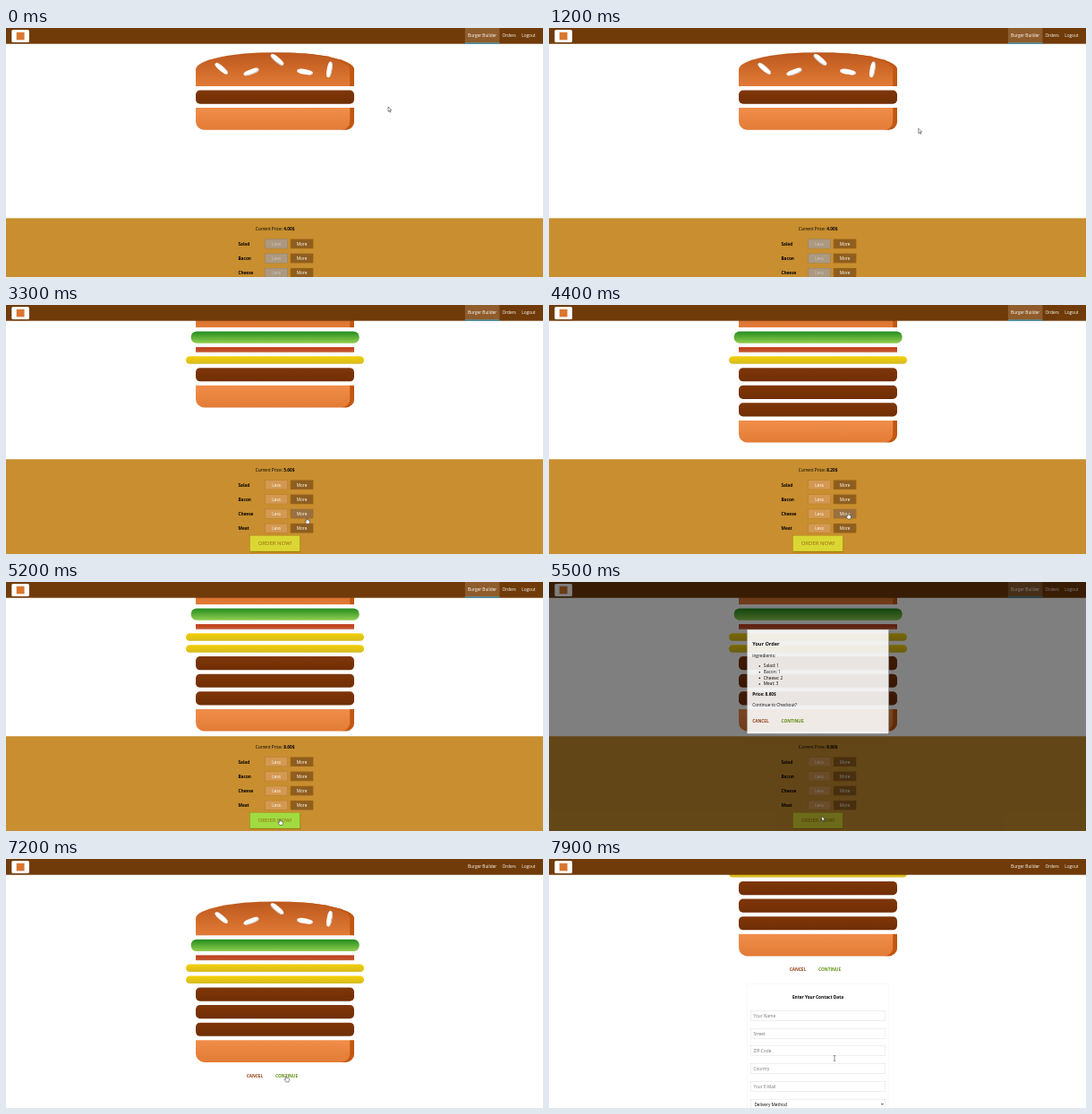
Recreate the animation shown at these times as an HTML page. Size 600 by 278 pixels, loop 8000 ms.

```html
<!DOCTYPE html>
<html lang="en">
<head>
<meta charset="utf-8">
<title>Burger Builder</title>
<style>
* { box-sizing: border-box; }
html, body { margin: 0; width: 100%; height: 100%; overflow: hidden; background: #fff; }
#view {
  position: absolute; left: 0; top: 0; width: 1902px; height: 880px; overflow: hidden;
  transform: scale(.316); transform-origin: 0 0; background: #fff;
  font: 15px/21px "Open Sans", "Noto Sans", sans-serif; color: #000;
}
p { margin: 16px 0; }
button { font: inherit; display: block; outline: none; }

nav {
  position: absolute; left: 0; top: 0; width: 100%; height: 56px; padding: 0 20px;
  background: #703b09; display: flex; align-items: center; justify-content: space-between;
}
.logo { width: 62px; height: 45px; border-radius: 5px; background: #fff; padding: 9px 17px; }
.logo i { display: block; width: 28px; height: 27px; background: #d9772f; }
.links { display: flex; height: 100%; color: #fff; }
.links span { padding: 17px 10px 0; border-bottom: 4px solid transparent; }
.links .active { background: #8f5c2c; border-color: #40a4c8; }

#page { position: absolute; left: 0; top: 0; width: 100%; padding-top: 72px; }
#burger { width: 700px; height: 600px; margin: 0 auto; overflow: hidden; }
#burger > div { width: 80%; margin: 14px auto; position: relative; }
#burger .top {
  height: 120px; background: linear-gradient(#bc581e, #e27b36);
  border-radius: 50% 50% 0 0; box-shadow: inset -15px 0 #c15711;
}
#burger .bottom {
  height: 78px; background: linear-gradient(#f08e4a, #e27b36);
  border-radius: 0 0 30px 30px; box-shadow: inset -15px 0 #c15711;
}
#burger .salad { width: 85%; height: 42px; background: linear-gradient(#228c1d, #91ce50); border-radius: 20px; }
#burger .bacon { height: 18px; background: linear-gradient(#bf3813, #c45e38); }
#burger .cheese { width: 90%; height: 27px; background: linear-gradient(#f4d004, #d6bb22); border-radius: 20px; }
#burger .meat { height: 48px; background: linear-gradient(#7f3608, #702e05); border-radius: 15px; }
.seed, .seed::before, .seed::after { position: absolute; background: #fff; border-radius: 40%; }
.seed { width: 10%; height: 15%; top: 50%; }
.seed::before, .seed::after { width: 100%; height: 100%; }
.s1 { left: 30%; transform: rotate(-20deg); box-shadow: inset -2px -3px #c9c9c9; }
.s1::after { content: ""; left: -170%; top: -260%; transform: rotate(60deg); box-shadow: inset -1px 2px #c9c9c9; }
.s1::before { content: ""; left: 180%; top: -50%; transform: rotate(60deg); box-shadow: inset -1px -3px #c9c9c9; }
.s2 { left: 64%; transform: rotate(10deg); box-shadow: inset -3px 0 #c9c9c9; }
.s2::before { content: ""; left: 150%; top: -130%; transform: rotate(90deg); box-shadow: inset 1px 3px #c9c9c9; }

#panel {
  height: 345px; padding-top: 12px; background: #c88e2f;
  display: flex; flex-direction: column; align-items: center;
}
.control { display: flex; align-items: center; margin: 5px 0; }
.control b { width: 100px; padding: 10px; }
.control button { width: 80px; height: 33px; margin: 0 5px; padding: 0; border: 1px solid #aa6817; color: #fff; }
.less { background: #d39952; }
.more { background: #8f5e1e; }
.less.hover { background: #daa972; }
.more.hover { background: #99703f; }
.control .less:disabled { background: #ac9980; border-color: #7e7365; color: #ccc; }
.order {
  width: 178px; height: 57px; padding: 0; font-size: 19px; color: #966909;
  background: #dad735; border: 1px solid #966909; box-shadow: 2px 2px 2px #966909;
}
.order.hover { background: #a0db41; }

.acts { display: flex; }
.acts button { background: none; border: 0; padding: 10px; margin: 10px; font-weight: bold; }
.acts .no { color: #944317; margin-left: 0; padding-left: 0; margin-right: 14px; }
.acts .yes { color: #5c9210; }
#shade { position: absolute; inset: 0; background: rgba(0, 0, 0, .5); }
#modal {
  position: absolute; left: 701px; top: 264px; width: 500px; height: 368px; padding: 37px 17px 0;
  background: #fff; border: 1px solid #ccc; box-shadow: 1px 1px 1px #000;
}
#modal h3 { font-size: 17.5px; line-height: 25px; margin: 0 0 18px; }
#modal ul { margin: 0; padding-left: 40px; }

#summary .acts { justify-content: center; }
#form {
  width: 500px; height: 700px; margin: 20px auto 0; padding: 35px 10px 0; text-align: center;
  border: 1px solid #eee; box-shadow: 0 2px 3px #ccc;
}
#form h4 { margin: 0 0 23px; font-size: 15px; }
.field { height: 62.6px; padding: 13.3px 0; text-align: left; }
.field div { height: 36px; border: 1px solid #ccc; padding: 7px 10px; color: #757575; position: relative; }
.field .pick { color: #000; padding-left: 13px; }
.pick svg { position: absolute; right: 5px; top: 13px; }

#pointer { position: absolute; left: 0; top: 0; pointer-events: none; }
#pointer svg { position: absolute; overflow: visible; fill: #fff; stroke: #000; stroke-width: 1.4; stroke-linejoin: round; }
[hidden] { display: none !important; }
</style>
</head>
<body>
<div id="view">
  <div id="page">
    <div id="burger"></div>
    <div id="panel">
      <p>Current Price: <b id="price"></b></p>
      <button class="order">ORDER NOW!</button>
    </div>
    <div id="summary">
      <div class="acts"><button class="no">CANCEL</button><button class="yes">CONTINUE</button></div>
      <div id="form"><h4>Enter Your Contact Data</h4></div>
    </div>
  </div>
  <nav>
    <div class="logo"><i></i></div>
    <div class="links"><span id="home">Burger Builder</span><span>Orders</span><span>Logout</span></div>
  </nav>
  <div id="shade"></div>
  <div id="modal">
    <h3>Your Order</h3>
    <p>ingredients:</p>
    <ul id="list"></ul>
    <p><b>Price: <span id="total"></span></b></p>
    <p>Continue to Checkout?</p>
    <div class="acts"><button class="no">CANCEL</button><button class="yes">CONTINUE</button></div>
  </div>
  <div id="pointer">
    <svg id="arrow" width="13" height="20"><path d="M0 0V17L4 13.5L6.7 19.5L9.3 18.4L6.7 12.4H12Z"/></svg>
    <svg id="hand" width="18" height="23" style="left:-7px"><path d="M5 13V2Q7-1 9 2V8Q11 6.5 12 8.5Q14 7.5 15 9.5Q17.5 8.5 18 11V16L15.5 22H7L1 14.5Q0 11.5 3 11.8Z"/></svg>
    <svg id="beam" width="8" height="18" style="left:-4px;top:-9px"><path fill="none" d="M0 0H3L4 1L5 0H8M4 1V17M0 18H3L4 17L5 18H8"/></svg>
  </div>
</div>
<script>
const LOOP = 8000, SCALE = .316;
const $ = id => document.getElementById(id);

// layer name, price, starting count, times it is added
const layers = [
  ['Salad', .5, 0, [2500]],
  ['Bacon', .7, 0, [2800]],
  ['Cheese', .4, 0, [3200, 4500]],
  ['Meat', 1.3, 1, [3800, 4100]]
];
const OPEN = 5300, CHECKOUT = 6700, FORM = 7250;

// pointer stops: time, x, y
const path = [
  [0, 427, 88], [1000, 427, 88], [1800, 337, 241], [2500, 337, 241], [2700, 337, 257],
  [2950, 337, 257], [3150, 336, 237.5], [3350, 336, 237.5], [3650, 335, 249], [4150, 335, 249],
  [4350, 334, 232], [4550, 334, 232], [5050, 306, 264.5], [5400, 306, 264.5], [6250, 275, 185],
  [6650, 275, 185], [7100, 313, 242], [7300, 313, 242], [7750, 319, 222.5], [LOOP, 319, 222.5]
];

const clamp = v => Math.max(0, Math.min(1, v));
const span = (t, from, to) => clamp((t - from) / (to - from));
const smooth = p => p * p * (3 - 2 * p);
const easeOut = p => 1 - (1 - p) ** 2;

const order = document.querySelector('.order');
const lessButtons = layers.map(([name]) => {
  const row = document.createElement('div');
  row.className = 'control';
  row.innerHTML = `<b>${name}</b><button class="less">Less</button><button class="more">More</button>`;
  $('panel').insertBefore(row, order);
  return row.querySelector('.less');
});

$('form').innerHTML += ['Your Name', 'Street', 'ZIP-Code', 'Country', 'Your E-Mail']
  .map(s => `<div class="field"><div>${s}</div></div>`).join('') +
  '<div class="field"><div class="pick">Delivery Method<svg width="11" height="8">' +
  '<path d="M1 1L5.5 6L10 1" fill="none" stroke="#000" stroke-width="2.4"/></svg></div></div>';

let shown = '';
function stack(counts) {
  if (shown === counts.join()) return;
  shown = counts.join();
  const price = layers.reduce((sum, l, i) => sum + l[1] * (counts[i] - l[2]), 4).toFixed(2) + '$';
  $('price').textContent = $('total').textContent = price;
  $('burger').innerHTML =
    '<div class="top"><i class="seed s1"></i><i class="seed s2"></i></div>' +
    layers.map((l, i) => `<div class="${l[0].toLowerCase()}"></div>`.repeat(counts[i])).join('') +
    '<div class="bottom"></div>';
  $('list').innerHTML = layers.map((l, i) => `<li>${l[0]}: ${counts[i]}</li>`).join('');
  // the first patty belongs to the base burger and cannot be removed
  lessButtons.forEach((b, i) => b.disabled = i < 3 && !counts[i]);
}

function pointerAt(t) {
  let i = 1;
  while (i < path.length - 1 && path[i][0] < t) i++;
  const [t0, x0, y0] = path[i - 1], [t1, x1, y1] = path[i];
  const p = smooth(span(t, t0, t1));
  return [x0 + (x1 - x0) * p, y0 + (y1 - y0) * p];
}

function draw(now) {
  const t = now % LOOP;
  const checkout = t >= CHECKOUT, modal = t >= OPEN && !checkout;
  stack(layers.map(l => l[2] + l[3].filter(at => t >= at).length));

  $('panel').hidden = checkout;
  $('summary').hidden = !checkout;
  $('form').hidden = t < FORM;
  $('home').className = checkout ? '' : 'active';
  $('page').style.paddingTop = (checkout ? 136 : 72) + 'px';
  const scroll = checkout ? 375 * smooth(span(t, 7400, 7800)) : 127 * smooth(span(t, 2950, 3100));
  $('page').style.transform = `translateY(${-scroll}px)`;

  const p = easeOut(span(t, OPEN, OPEN + 300));
  $('shade').hidden = $('modal').hidden = !modal;
  $('modal').style.opacity = p;
  $('modal').style.transform = `translateY(${-880 * (1 - p)}px)`;

  const [x, y] = pointerAt(t);
  $('pointer').style.transform = `translate(${x / SCALE}px, ${y / SCALE}px)`;
  const hit = document.elementFromPoint(x, y);
  const button = hit && hit.closest('button:not(:disabled)');
  const field = hit && hit.closest('.field');
  document.querySelectorAll('.hover').forEach(b => b.classList.remove('hover'));
  if (button) button.classList.add('hover');
  $('hand').style.display = button ? '' : 'none';
  $('beam').style.display = field ? '' : 'none';
  $('arrow').style.display = button || field ? 'none' : '';

  requestAnimationFrame(() => draw(performance.now()));
}
draw(0);
</script>
</body>
</html>
```
